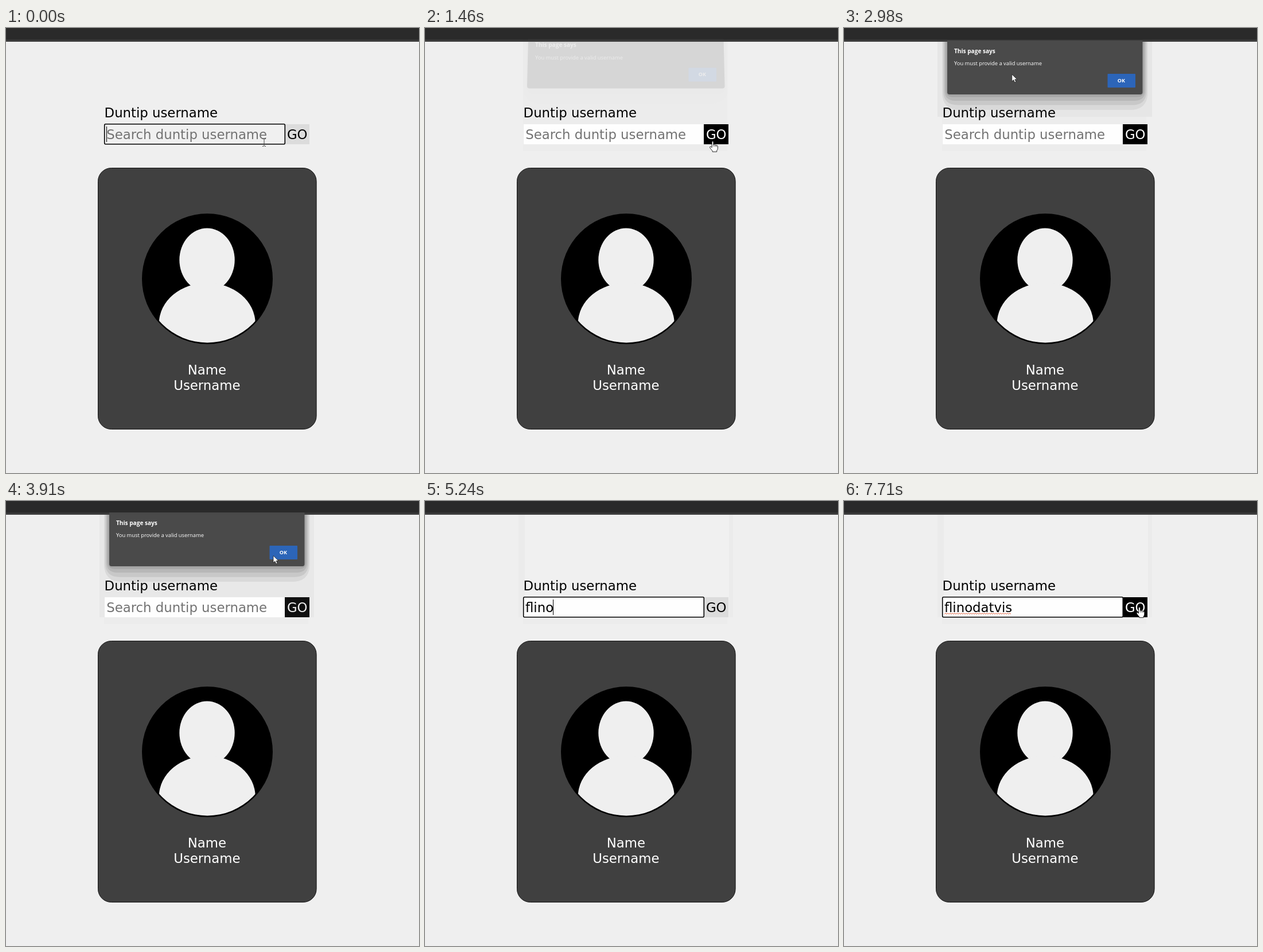
An HTML page for the animation above (8 s loop, 720 by 777 pixels).

```html
<!DOCTYPE html>
<html lang="en">
<head>
<meta charset="utf-8">
<title>User search</title>
<style>
html, body { margin: 0; width: 100%; height: 100%; overflow: hidden; background: #efefef; }
svg { display: block; width: 720px; height: 777px; }
text { font: 22.8px "DejaVu Sans", Verdana, sans-serif; white-space: pre; }
.mid { text-anchor: middle; }
#dialog text { font-family: "Open Sans", "Noto Sans", sans-serif; fill: #fff; }
#dialog .body { font-size: 9.35px; }
#dialog .title { font-size: 10.1px; font-weight: 700; }
#dialog .ok { font-size: 9px; font-weight: 700; }
</style>
</head>
<body>
<svg viewBox="0 0 720 777" xmlns="http://www.w3.org/2000/svg">
  <defs>
    <clipPath id="disc"><circle cx="351" cy="437.8" r="111.6"/></clipPath>
  </defs>
  <rect width="720" height="777" fill="#efefef"/>
  <rect width="720" height="24" fill="#3d3d3d"/>
  <rect width="720" height="20.5" fill="#2a2a2a"/>

  <rect id="trace" x="171" y="24" width="356" height="191" fill="#ececec"/>
  <rect id="margin" x="163" y="24" width="374"/>
  <rect id="cleared" x="174" y="24" width="356" height="179" fill="#f0f0f0"/>
  <g id="shadow"></g>

  <text x="171.6" y="155.5">Duntip username</text>
  <rect id="field" x="172" y="168" width="314" height="35"/>
  <rect id="go" x="486" y="168" width="43" height="35"/>
  <text id="goText" class="mid" x="507.7" y="194.3">GO</text>
  <rect id="ring" x="171.7" y="167.7" width="314.6" height="35" rx="2" fill="none" stroke="#000" stroke-width="1.6"/>
  <text id="hint" x="175.2" y="194.3" fill="#737373">Search duntip username</text>
  <text id="typed" x="175" y="194.3"></text>
  <path id="wave" fill="none" stroke="#e2613c"/>
  <rect id="caret" y="172" width="1" height="27"/>

  <rect x="160.5" y="244.5" width="380.6" height="456" rx="23" fill="#404040" stroke="#111"/>
  <circle cx="351" cy="438" r="114" fill="#000"/>
  <g fill="#efefef" clip-path="url(#disc)">
    <ellipse cx="350.5" cy="405" rx="48.2" ry="55.5"/>
    <ellipse cx="350.7" cy="516" rx="84" ry="71"/>
  </g>
  <g fill="#fff" class="mid">
    <text x="350.4" y="605">Name</text>
    <text x="350.4" y="632">Username</text>
  </g>

  <g id="dialog">
    <path id="panel" fill="#4a4a4a"/>
    <g id="content">
      <text class="title" x="192" y="44">This page says</text>
      <text class="body" x="192" y="65.2">You must provide a valid username</text>
      <rect x="459.5" y="80" width="48.5" height="24" rx="1" fill="#2c65b9"/>
      <text class="ok mid" x="483.4" y="95">OK</text>
    </g>
  </g>

  <g id="beam" fill="none" stroke="#444">
    <path d="M-3 -6.5H-1L0 -5.5L1 -6.5H3M0 -5.5V5.5M-3 6.5H-1L0 5.5L1 6.5H3"/>
  </g>
  <g id="arrow">
    <path d="M0 0V12.3L2.9 9.7L4.9 14.2L7.1 13.2L5.1 8.9H9Z" fill="#fff" stroke="#111" stroke-width=".7"/>
  </g>
  <g id="hand">
    <path d="M-1.4 1.5Q0 -.8 1.4 1.5V6.4Q3 5.4 4 7Q5.6 6 6.4 7.6Q8.6 7 8.8 9.4V13Q8.6 15.4 7.2 16.4V18.6H-.4V17Q-3.4 14 -5 11Q-5 8.8 -2.8 9.8L-1.4 11.2Z" fill="#fff" stroke="#111" stroke-width=".9"/>
    <path d="M1.4 6.4V9.6M4 7V9.8M6.4 7.6V10" fill="none" stroke="#111" stroke-width=".7"/>
  </g>
</svg>
<script>
const LOOP = 8000;
const USER = "flinodatvis";
const OPEN = 1330, CLOSE = 4180, CLICK = 4460, TYPE = 4960, WAKE = 6690, SPELL = 6960;

const $ = id => document.getElementById(id);
const set = (el, attrs) => { for (const k in attrs) el.setAttribute(k, attrs[k]); };
const show = (el, on) => { el.style.display = on ? "" : "none"; };
const grey = v => `rgb(${v},${v},${v})`;
const ramp = (t, a, b) => Math.min(1, Math.max(0, (t - a) / (b - a)));

// Pointer legs: begin, end, steps, ease-out power, destination
const HOME = [450, 200];
const legs = [
  { from: 10, to: 280, steps: 2, ease: 1, x: 501.5, y: 197.5 },
  { from: 1850, to: 2490, steps: 5, ease: 1.55, x: 235, y: 76 },
  { from: 2610, to: 3620, steps: 8, ease: 1, x: 466, y: 95.5 },
  { from: 4030, to: CLOSE, steps: 1, ease: 1, x: 384.5, y: 174 },
  { from: CLOSE, to: 4310, steps: 1, ease: 1, x: 390, y: 174.5 },
  { from: 6670, to: 7210, steps: 4, ease: 4, x: 515, y: 185 }
];

function pointerAt(t) {
  let [x, y] = HOME;
  for (const leg of legs) {
    const k = Math.floor(ramp(t, leg.from, leg.to) * leg.steps) / leg.steps;
    const p = 1 - (1 - k) ** leg.ease;
    x += (leg.x - x) * p;
    y += (leg.y - y) * p;
  }
  const modal = t >= OPEN && t < CLOSE;
  let kind = "beam";
  if (modal && y < 116) kind = "arrow";
  else if (modal || x >= 486) kind = "hand";
  if (t >= CLICK && t < WAKE) kind = "none";
  return { x, y, kind };
}

// Panel with rounded lower corners, optionally wider at the bottom.
function slab(x, top, bottom, r, flare = 0) {
  const right = 700.5 - x, a = x - flare, b = right + flare;
  return `M${x} ${top}H${right}L${b} ${bottom - r}Q${b} ${bottom} ${b - r} ${bottom}` +
    `H${a + r}Q${a} ${bottom} ${a} ${bottom - r}Z`;
}

const LAYERS = 4;
for (let i = 0; i < LAYERS; i++) {
  const layer = document.createElementNS("http://www.w3.org/2000/svg", "path");
  set(layer, { fill: grey(217 - 17 * i) });
  $("shadow").append(layer);
}

let wave = "M175 197.5";
for (let i = 1; i <= 58; i++) wave += `L${175 + i * 2} ${i % 2 ? 195.8 : 197.5}`;
set($("wave"), { d: wave });

function drawDialog(t) {
  const rise = ramp(t, 1425, 1725), fall = ramp(t, 3870, 4130);
  const alpha = rise - fall ** 3;
  const shift = 12 * (1 - rise + fall);
  const bottom = 116 - shift;

  show($("dialog"), alpha > 0);
  set($("dialog"), { opacity: alpha });
  set($("panel"), { d: slab(180, Math.max(19, 22 - shift), bottom, 4, 2.3 * (1 - rise)) });
  set($("content"), { transform: `translate(0 ${-shift})` });
  set($("shadow"), { opacity: alpha ** 2 });
  [...$("shadow").children].forEach((layer, i) => {
    const k = 1 - i / LAYERS;
    set(layer, { d: slab(179.5 - 8.5 * k, 24, bottom + 27 * k ** 1.3, 6 + 25 * k) });
  });

  // Faint tints that stay behind the dialog
  show($("trace"), rise > 0);
  show($("margin"), rise > .5);
  show($("cleared"), t >= CLOSE);
  set($("margin"), {
    height: fall ? 179 : 131,
    fill: grey(Math.round(230 + 5 * Math.sqrt(fall)))
  });
}

function drawForm(t, pointer) {
  const hover = ramp(t, 150, 580) - ramp(t, 3890, CLOSE) + ramp(t, 6850, 7210);
  set($("go"), { fill: grey(Math.round(220 * (1 - hover))) });
  set($("goText"), { fill: grey(Math.round(255 * hover)) });

  const count = t < TYPE ? 0 : Math.floor(1 + 10 * ramp(t, TYPE, 6050) ** .67);
  const word = USER.slice(0, count);
  if ($("typed").textContent !== word) $("typed").textContent = word;
  show($("hint"), !count);
  show($("wave"), t >= SPELL);
  set($("field"), { fill: grey(pointer.kind === "beam" && !count ? 240 : 254) });

  const focused = t < OPEN || t >= CLICK;
  const busy = t >= CLICK && t < WAKE;
  const lit = Math.floor((t + 390) / 540) % 2 === 0;
  show($("ring"), focused);
  show($("caret"), focused && (busy || lit));
  const width = count ? $("typed").getComputedTextLength() - 1 : 0;
  set($("caret"), { x: Math.round(175 + width) });
}

function drawPointer({ x, y, kind }) {
  for (const id of ["beam", "arrow", "hand"]) {
    show($(id), id === kind);
    set($(id), { transform: `translate(${x} ${y})` });
  }
}

const start = performance.now();
function frame() {
  const t = (performance.now() - start) % LOOP;
  const pointer = pointerAt(t);
  drawDialog(t);
  drawForm(t, pointer);
  drawPointer(pointer);
  requestAnimationFrame(frame);
}
frame();
</script>
</body>
</html>
```
